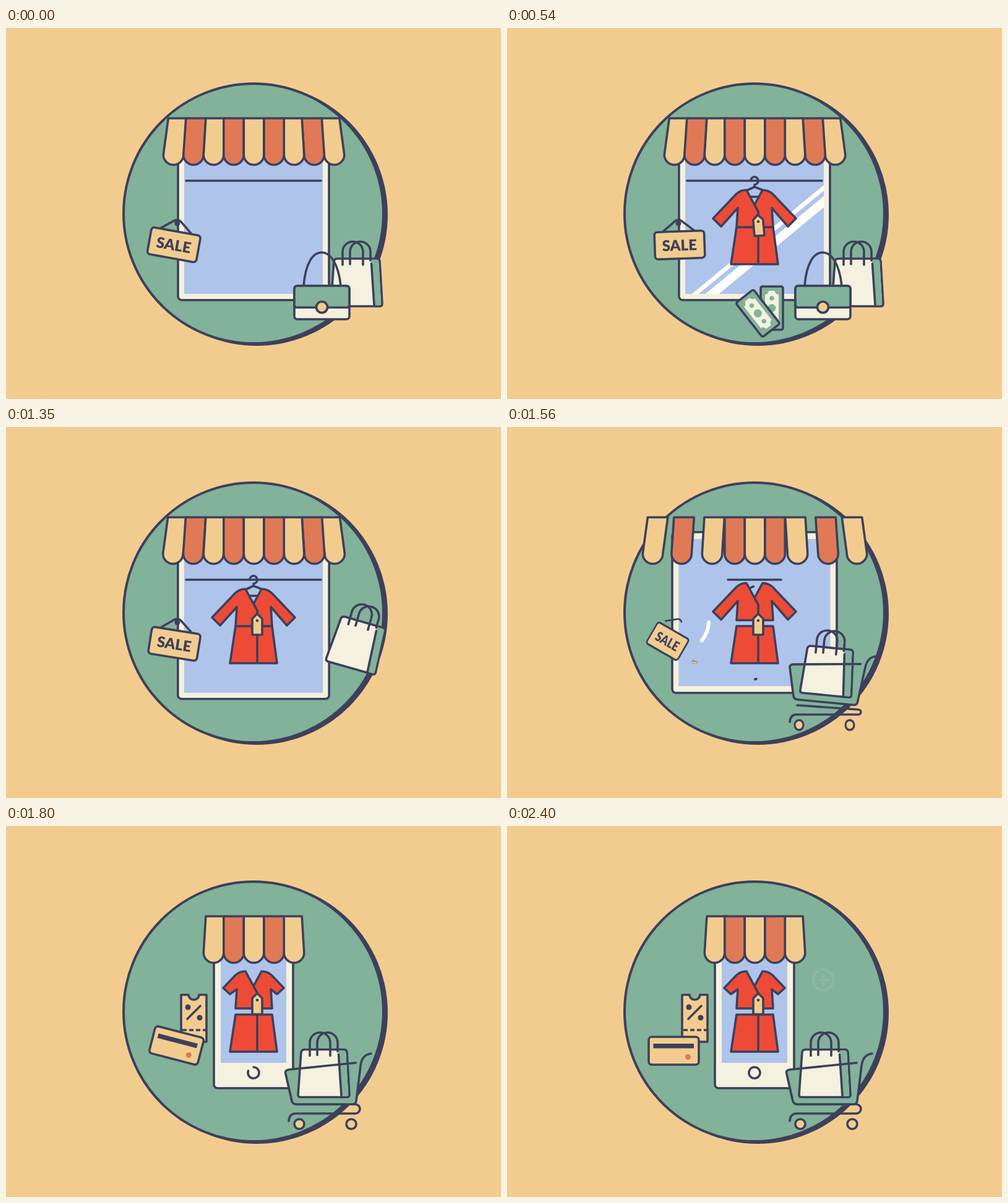
Animation, 800 px wide and 600 px high, one loop 4.2 s. Source, as an HTML page:

```html
<!DOCTYPE html>
<html lang="en">
<head>
<meta charset="utf-8">
<title>Shop to phone</title>
<style>
  html, body { margin: 0; width: 100%; height: 100%; overflow: hidden; background: #f2cc8f; }
  svg { display: block; width: 100%; height: 100%; }
  .ln { fill: none; }
  .navy { fill: #3d405b; stroke: none; }
  .cream { fill: #f4f1de; }
  .green { fill: #82b29a; }
  .sand { fill: #f2cc8f; }
  .red { fill: #ee4b37; }
  .flat { stroke: none; }
  text { font: 900 24px Lato, "Open Sans", sans-serif; fill: #3d405b; stroke: none; text-anchor: middle; }
</style>
</head>
<body>
<svg viewBox="0 0 800 600" stroke="#3d405b" stroke-width="3.6" stroke-linecap="round" stroke-linejoin="round">
  <defs>
    <clipPath id="clip"><rect id="clipBox"/></clipPath>
    <g id="bill">
      <rect class="green" x="410" y="418" width="36" height="70" rx="3"/>
      <path class="cream flat" d="M423 425H433A6 6 0 0 0 439 431V475A6 6 0 0 0 433 481H423A6 6 0 0 0 417 475V431A6 6 0 0 0 423 425Z"/>
      <g class="green flat">
        <circle cx="428" cy="453" r="6.5"/><circle cx="428" cy="437" r="3.7"/><circle cx="428" cy="469" r="3.7"/>
      </g>
    </g>
  </defs>

  <circle class="navy" cx="405" cy="302" r="212"/>
  <circle class="green" cx="400" cy="300" r="210" stroke-width="4"/>

  <rect id="frame" class="cream" rx="6"/>
  <rect id="glass" class="flat" fill="#aec4ea"/>
  <path id="ring" class="ln"/>
  <g clip-path="url(#clip)">
    <g id="shine" class="flat" fill="#fff">
      <path d="M240 21.6L560 -242.4V-233.4L240 30.6Z"/>
      <path d="M240 39.6L560 -224.4V-206.4L240 57.6Z"/>
    </g>
    <path id="rail" class="ln"/>
    <g id="coat">
      <path id="hook" class="ln" pathLength="1" d="M387 263L400 257V253.500Q406.500 252 406 246.500A6 6 0 0 0 394 247"/>
      <path id="hangBar" class="ln" d="M400 257L413 262M393 273H407"/>
      <path id="skirt" class="red" d="M371 322H430L438 382H362ZM406 322V382"/>
      <g id="top"><path id="right" class="red"/><path id="left" class="red"/></g>
      <g id="tag">
        <path class="sand" d="M398 310L406 302L414 310V336H398Z"/>
        <circle class="navy" cx="406" cy="313" r="2.3"/>
      </g>
    </g>
  </g>
  <path id="swoosh" class="ln" stroke="#fff" stroke-width="6"/>
  <g id="awning"></g>

  <g id="coupon">
    <path class="sand" d="M283 273H295A8.500 8 0 0 0 312 273H324V349H283Z"/>
    <path class="ln" d="M293 312L314 291"/>
    <path class="ln" stroke-linecap="butt" stroke-dasharray="7 4" d="M285 330H323"/>
    <circle class="navy" cx="294" cy="293" r="4.500"/><circle class="navy" cx="313" cy="310" r="4.500"/>
  </g>
  <g id="card">
    <rect class="sand" x="229" y="341" width="81" height="45" rx="5"/>
    <rect class="navy" x="236.500" y="352" width="65.500" height="7.500"/>
    <circle class="flat" fill="#e07a56" cx="292.500" cy="373.500" r="4.500"/>
  </g>

  <g id="sign">
    <circle id="nail" class="navy" cx="277" cy="316" r="4.500"/>
    <path id="cord" class="ln" pathLength="1" d="M251 329L272 312Q277 308.500 282 312L303 329"/>
    <g id="board">
      <rect class="sand" x="237.500" y="329" width="80.500" height="44" rx="5"/>
      <text x="277.500" y="360">SALE</text>
    </g>
  </g>

  <g id="bill1"><use href="#bill"/></g>
  <g id="bill2"><use href="#bill"/></g>

  <path id="base" class="ln"/>
  <g id="wheelL"><circle class="sand" r="8"/></g>
  <g id="wheelR"><circle class="sand" r="8"/></g>
  <path id="basketFill" class="green flat" d="M565 383L457 394Q450 395 452 401L462 445Q464 450 469 450H560Q565 450 566 445L573 384Z"/>
  <g id="bag">
    <path class="ln" d="M556 375V362A16.500 16.500 0 0 1 589 362V375"/>
    <path class="cream" d="M536 373H599Q603 373 604 377L608 446Q608 450 604 450H529Q525 450 525 446L530 377Q531 373 536 373Z"/>
    <path class="green flat" d="M590 374.800H599Q602 375 602.200 377L606.200 446Q606 448 604 448.200H596Z"/>
    <path class="ln" d="M590.500 381L595 448M556 373V382M589 373V376M544 383V362A16.500 16.500 0 0 1 577 362V383"/>
  </g>
  <path id="basket" class="ln" d="M565 383L457 394Q450 395 452 401L462 445Q464 450 469 450H560Q565 450 566 445L573 388Q575 370 590 368"/>

  <g id="purse">
    <path class="ln" d="M481 417C484 380 496 363 510 363S537 380 541 417"/>
    <rect class="cream" x="466" y="417" width="89" height="54" rx="5"/>
    <path class="green" d="M471 417H550Q555 417 555 422V448Q555 452 551 452H470Q466 452 466 448V422Q466 417 471 417Z"/>
    <circle class="sand" cx="510.500" cy="451.500" r="9"/>
  </g>

  <g id="plus" stroke="#f4f1de" fill="none">
    <circle cx="511" cy="249" r="16.500"/>
    <path d="M503 249H519M511 241V257"/>
  </g>
</svg>

<script>
const LOOP = 4200, STEP = 30, REST = 2400;
const $ = id => document.getElementById(id);
const set = (id, attrs) => {
  for (const k in attrs) $(id).setAttribute(k, attrs[k]);
};
const move = (id, value) => set(id, { transform: value });
const show = (id, on) => { $(id).style.display = on ? '' : 'none'; };
const clamp = v => Math.min(1, Math.max(0, v));
const mix = (a, b, u) => a + (b - a) * u;
const smooth = u => u * u * (3 - 2 * u);
const part = (t, a, b) => clamp((t - a) / (b - a));

// Eased value from pairs of time and value
function key(t, ...k) {
  for (let i = 0; i < k.length - 2; i += 2) {
    if (t < k[i + 2]) return mix(k[i + 1], k[i + 3], smooth(part(t, k[i], k[i + 2])));
  }
  return k[k.length - 1];
}
const scaleAt = (x, y, sx, sy = sx) =>
  `translate(${x} ${y}) scale(${sx} ${sy}) translate(${-x} ${-y})`;
const spin = (a, x, y) => `rotate(${a} ${x} ${y})`;

function arc(cx, cy, r, from, to) {
  const at = d => {
    const a = d * Math.PI / 180;
    return `${cx + r * Math.cos(a)} ${cy + r * Math.sin(a)}`;
  };
  return `M${at(from)}A${r} ${r} 0 ${to - from > 180 ? 1 : 0} 1 ${at(to)}`;
}

// Awning stripes, outer ones lie under inner ones
const LEAN = [8, 4, 3.6, 0, 0];
const SPREAD = [35, 21, 4, 0, 0];
const stripes = [0, 8, 1, 7, 2, 6, 3, 5, 4].map(i => {
  const el = document.createElementNS('http://www.w3.org/2000/svg', 'path');
  el.setAttribute('fill', i % 2 ? '#e07a56' : '#f2cc8f');
  $('awning').append(el);
  return { el, i, side: i > 4 ? -1 : 1, rank: Math.min(i, 8 - i) };
});
const stripeX = i => 254.3 + 32.5 * i;

function drawAwning(pull, merge) {
  for (const { el, i, side, rank } of stripes) {
    const goal = rank < 2 ? (side > 0 ? 2 : 6) : i;
    const x = mix(stripeX(i) - side * SPREAD[rank] * pull, stripeX(goal), merge);
    const lean = mix(LEAN[rank], LEAN[Math.max(rank, 2)], merge) * side;
    el.setAttribute('d', `M${x + lean} 146L${x} 205a16.25 16.25 0 0 0 32.5 0L${x + 32.5 + lean} 146Z`);
    el.style.display = rank < 2 && merge >= 1 ? 'none' : '';
  }
}

function drawWindow(t, pull, merge) {
  const box = (half, top, bottom) =>
    ({ x: 400 - half, y: top, width: 2 * half, height: bottom - top });
  set('frame', box(mix(122 + 11 * pull, 64, merge), 160 + 10 * pull, mix(440 - 10 * pull, 424, merge)));
  const pane = box(mix(112 + 10.5 * pull, 53, merge), 171 + 10 * pull, mix(430 - 11 * pull, 383, merge));
  set('glass', pane);
  set('clipBox', pane);
  move('shine', `translate(0 ${262 + (t - 270) * .722})`);
  show('shine', t < 800);

  const rail = 109 - 66 * part(t, 1380, 1560) ** 2 - 43 * part(t, 1560, 1620);
  set('rail', { d: `M${400 - rail} 247H${400 + rail}` });
  show('rail', rail > 0);

  set('ring', { d: arc(400, 399, 9, key(t, 1560, 70, 1800, -90), key(t, 1560, 86, 1800, 200, 2100, 262)) });
  show('ring', t >= 1560);
  set('swoosh', { d: arc(280, 315, 46, key(t, 1440, -60, 1560, 1, 1650, 70), key(t, 1440, -58, 1560, 41, 1650, 72)) });
  show('swoosh', t > 1440 && t < 1650);
}

function drawCoat(t, merge) {
  const slide = 195 + 205 * (1 - (1 - part(t, 0, 540)) ** 5);
  move('coat', `translate(${slide - 400} 0) ${spin(key(t, 0, 25, 270, 9.2, 540, 0), 400, 247)}`);
  const cuff = [mix(333, 351, merge), mix(308, 289, merge), mix(346, 362, merge), mix(321, 299, merge)];
  const [ax, ay, bx, by] = cuff;
  set('left', { d: `M387 262Q378 262 371 268L${ax} ${ay}L${bx} ${by}L373 291L371 322H406V297Z` });
  set('right', { d: `M413 262Q422 262 429 268L${800 - ax} ${ay}L${800 - bx} ${by}L428 291L430 322H406V297L400 286Z` });
  move('top', `translate(0 ${key(t, 1440, 0, 1560, -9.5, 1770, -27)})`);
  move('skirt', `translate(0 ${key(t, 1560, 0, 1770, -17)})`);
  const swing = key(t, 0, 15, 270, 9, 540, -5, 720, 0, 2130, 0, 2220, 6, 2310, -4, 2400, 0);
  move('tag', `translate(0 ${key(t, 1560, 0, 1770, -31.5)}) ${spin(swing, 406, 313)}`);
  set('hook', { 'stroke-dasharray': `${key(t, 1410, 1, 1560, .27, 1620, 0)} 2` });
  show('hook', t < 1620);
  show('hangBar', t < 1500);
}

function drawSign(t) {
  const turn = key(t, 0, 10.2, 270, 3.5, 540, -2, 780, 0, 1230, 0, 1560, 30, 1680, 55);
  move('sign', spin(turn, 277, 315));
  const sx = key(t, 1320, 1, 1560, .72, 1650, 0);
  const sy = key(t, 1320, 1, 1560, .9, 1650, 0);
  move('board', scaleAt(277.5, 351, sx, sy));
  move('cord', scaleAt(277, 312, sx));
  set('cord', { 'stroke-dasharray': `${key(t, 1350, 1, 1560, .6, 1650, .4)} 2` });
  move('nail', scaleAt(277, 316, key(t, 1380, 1, 1530, 0)));
  show('sign', t < 1650);
}

function drawMoney(t) {
  move('bill1', scaleAt(428, 453, key(t, 60, 0, 210, 1, 1230, 1, 1350, 0)));
  move('bill2', spin(key(t, 270, 0, 540, -38, 1050, -38, 1230, 0), 429, 490));
  show('bill2', t > 270 && t < 1230);
  move('coupon', scaleAt(303, 349, key(t, 1590, 0, 1740, 1)));
  const size = key(t, 1500, 0, 1560, .1, 1740, 1);
  move('card', `${spin(key(t, 1800, 14.5, 2100, 0), 306, 383)} ${scaleAt(306, 383, size)}`);
}

function drawCart(t) {
  const grow = key(t, 1380, 0, 1515, 1);
  const tilt = key(t, 1380, 32, 1560, 5.5, 1770, 0);
  const k = clamp(tilt / 5.5);
  const lift = `${spin(tilt, 565, 450)} ${scaleAt(565, 450, grow)}`;
  move('basket', lift);
  move('basketFill', lift);
  const r = 7.5 - 3.5 * k;
  set('base', { d: `M457 477Q458 465 468 465H${572 - r}a${r} ${r} 0 0 0 0 ${-2 * r}L469 450` });
  move('base', scaleAt(515, 465, grow));
  move('wheelL', `translate(${474 - 2 * k} 482) scale(${grow * (1 - .13 * k)} ${grow})`);
  move('wheelR', `translate(${558 - 4 * k} 482) scale(${grow * (1 - .13 * k)} ${grow})`);

  const hop = smooth(part(t, 1200, 1500));
  move('bag', `${spin(tilt * hop, 565, 450)} translate(${-53 * hop} ${-11.5 * hop - 200 * hop * (1 - hop)})`);
  move('purse', scaleAt(510, 471, key(t, 1110, 1, 1320, 0)));
}

function draw(t) {
  const pull = 1.26 * part(t, 1317, 1590) ** 2;
  const merge = 1 - (1 - part(t, 1590, 1770)) ** 3;
  drawWindow(t, pull, merge);
  drawAwning(pull, merge);
  drawCoat(t, merge);
  drawSign(t);
  drawMoney(t);
  drawCart(t);
  move('plus', `translate(0 ${53 * (1 - part(t, 2130, 2400)) ** 2})`);
  set('plus', { opacity: key(t, 2130, 0, 2220, 1, 2400, .1) });
}

const start = performance.now();
function tick() {
  const t = Math.max(0, performance.now() - start) % LOOP;
  draw(Math.min(REST, Math.floor(t / STEP) * STEP));
  requestAnimationFrame(tick);
}
tick();
</script>
</body>
</html>
```
